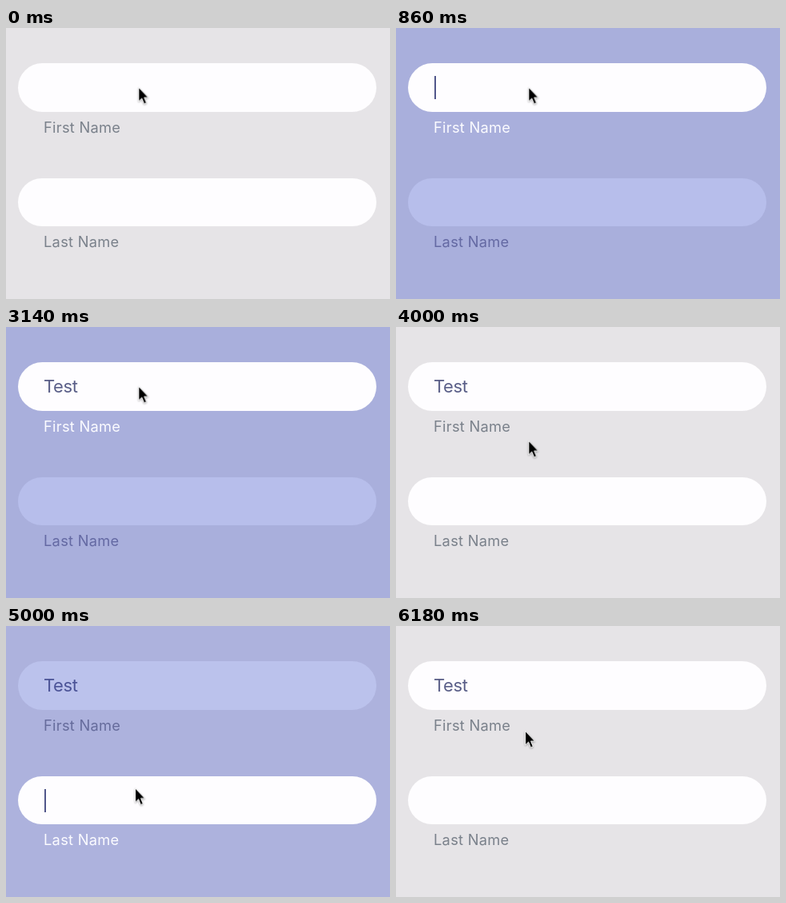
These frames come from a looping animation (480x339 px, 6.22 s). An HTML page:

```html
<!DOCTYPE html>
<html lang="en">
<head>
<meta charset="utf-8">
<title>Name form</title>
<style>
  :root {
    --idle: #e6e4e7; --active: #a9afdc;
    --white: #fefdff; --dim: #b7beeb;
    --grey: #7a818b; --ink: #5a5f88;
  }
  html, body { margin: 0; width: 100%; height: 100%; overflow: hidden; }
  .stage, .stage * { animation: 6.22s ease-in-out infinite; }
  .stage {
    position: relative; width: 480px; height: 339px; overflow: hidden;
    font-family: Inter, sans-serif; background: var(--idle);
    animation-name: stage;
  }
  .field, .label, .typed, .clip, .caret, .pointer { position: absolute; }
  .field { left: 15px; width: 448px; height: 60.6px; border-radius: 31px; background: var(--white); }
  .label { left: 47px; font-size: 18.3px; line-height: 24px; letter-spacing: .27px; white-space: nowrap; color: var(--grey); }
  .first { top: 44px; animation-name: first; }
  .last { top: 187.6px; animation-name: last; }
  .label1 { top: 112px; animation-name: label1; }
  .label2 { top: 255px; animation-name: label2; }
  .typed { left: 47px; top: 60px; height: 29px; animation-name: type; animation-timing-function: step-end; }
  .clip { inset: -1px 0 1px; overflow: hidden; font-size: 22px; line-height: 30px; letter-spacing: -.4px; white-space: nowrap; color: var(--ink); animation-name: ink; }
  .caret { left: 100%; top: 0; width: 2.5px; height: 29px; margin-left: .5px; background: #51568a; opacity: 0; }
  .caret1 { animation-name: caret1; }
  .caret2 { left: 47px; top: 203.5px; animation-name: caret2; }
  .pointer { left: 0; top: 0; overflow: visible; animation-name: pointer; filter: drop-shadow(0 1px 1px #0005); }

  @keyframes stage {
    0%, 6.6% { background: var(--idle); }
    11.74%, 60.13% { background: var(--active); }
    63.83%, 76.13% { background: var(--idle); }
    81.27%, 95.66% { background: var(--active); }
    99.3%, 100% { background: var(--idle); }
  }
  @keyframes first {
    0%, 76.13% { background: var(--white); }
    81.27%, 95.66% { background: var(--dim); }
    99.3%, 100% { background: var(--white); }
  }
  @keyframes last {
    0%, 6.6% { background: var(--white); }
    11.74%, 60.13% { background: var(--dim); }
    63.83%, 100% { background: var(--white); }
  }
  @keyframes label1 {
    0%, 6.6% { color: var(--grey); }
    8.2%, 60.13% { color: #fbfbff; }
    63.83%, 76.13% { color: var(--grey); }
    77.8%, 95.66% { color: #666c9c; }
    99.3%, 100% { color: var(--grey); }
  }
  @keyframes label2 {
    0%, 6.6% { color: var(--grey); }
    8.2%, 60.13% { color: #6469a3; }
    63.83%, 76.13% { color: var(--grey); }
    77.8%, 95.66% { color: #fbfbff; }
    99.3%, 100% { color: var(--grey); }
  }
  @keyframes ink {
    0%, 76.13% { color: var(--ink); }
    77.8%, 95.66% { color: #4c5497; }
    99.3%, 100% { color: var(--ink); }
  }
  @keyframes type {
    0% { width: 0; }
    25.56% { width: 13px; }
    28.46% { width: 24px; }
    35.85% { width: 34px; }
    37.3%, 100% { width: 43px; }
  }
  @keyframes caret1 {
    0%, 6.58% { opacity: 0; }
    6.59%, 16.88% { opacity: 1; }
    21.38%, 25.55% { opacity: 0; }
    25.56%, 45.98% { opacity: 1; }
    50.48%, 56.27% { opacity: 0; }
    58.5%, 60.12% { opacity: 1; }
    60.13%, 100% { opacity: 0; }
  }
  @keyframes caret2 {
    0%, 76.04% { opacity: 0; }
    76.05%, 86.17% { opacity: 1; }
    90.68%, 100% { opacity: 0; }
  }
  @keyframes pointer {
    0%, 56.6% { transform: translate(165.2px, 73.7px); }
    59.5%, 66.56% { transform: translate(165.2px, 141.7px); }
    72.35%, 86.8% { transform: translate(161px, 202.4px); }
    94.86%, 100% { transform: translate(161px, 130.8px); }
  }
</style>
</head>
<body>
<div class="stage">
  <div class="field first"></div>
  <div class="typed">
    <div class="clip">Test</div>
    <div class="caret caret1"></div>
  </div>
  <div class="label label1">First Name</div>
  <div class="field last"></div>
  <div class="caret caret2"></div>
  <div class="label label2">Last Name</div>
  <svg class="pointer" width="14" height="24">
    <path d="M.6 .6V18L4.6 14.3 7.4 21.2 10.4 20 7.6 13.2H12.6Z" stroke="#fff" stroke-width="1"/>
  </svg>
</div>
</body>
</html>
```
